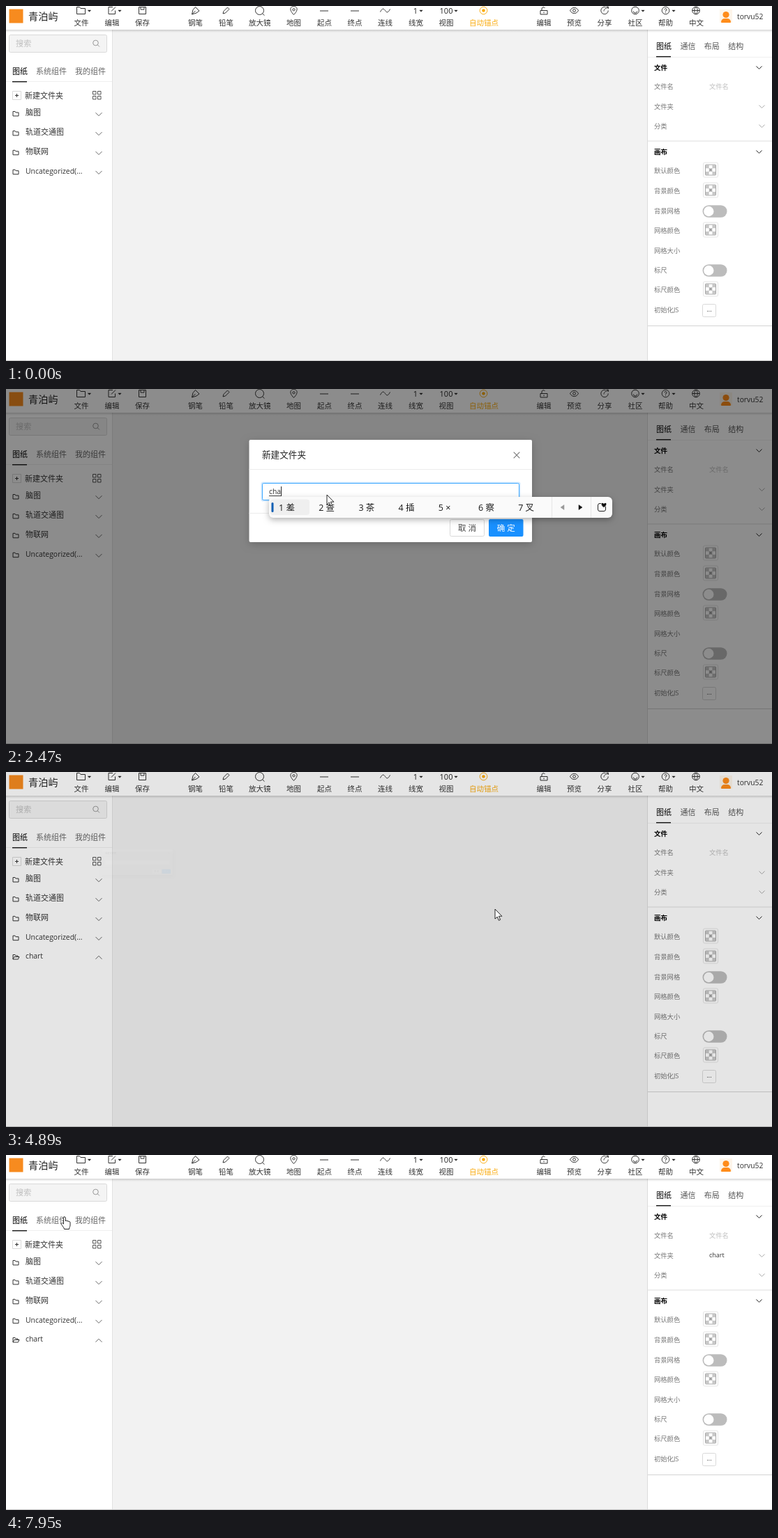
An HTML page with a canvas for the animation above (8000 ms loop, 1098 px wide and 510 px high).

```html
<!DOCTYPE html>
<html lang="zh-CN">
<head>
<meta charset="utf-8">
<title>新建文件夹</title>
<style>
html, body { margin: 0; width: 100%; height: 100%; overflow: hidden; background: #fff; }
canvas { display: block; width: 100vw; height: 100vh; }
</style>
</head>
<body>
<canvas id="stage"></canvas>
<script>
const W = 1098, H = 510, LOOP = 8000;
const FONT = '"Open Sans", "Noto Sans CJK SC", "Noto Sans CJK", sans-serif';
const BLUE = '#1890ff', INK = '#333', GREY = '#777';
const canvas = document.getElementById('stage');
const ctx = canvas.getContext('2d');
const ratio = window.devicePixelRatio || 1;
canvas.width = W * ratio;
canvas.height = H * ratio;

const clamp = v => Math.max(0, Math.min(1, v));
const within = (t, a, b) => t >= a && t < b;
const mix = (a, b, k) => a + (b - a) * k;

// y of a CSS cubic-bezier curve at x
function bezier(x1, y1, x2, y2) {
  const at = (a, b, u) => 3 * a * u * (1 - u) ** 2 + 3 * b * u * u * (1 - u) + u ** 3;
  return x => {
    let lo = 0, hi = 1;
    for (let i = 0; i < 24; i++) {
      const u = (lo + hi) / 2;
      if (at(x1, x2, u) < x) lo = u; else hi = u;
    }
    return at(y1, y2, lo);
  };
}
const zoomIn = bezier(.08, .82, .17, 1);
const zoomOut = bezier(.78, .14, .15, .86);

const ticks = [[0, 0, 1], [70, 660, 9], [840, 920, 2], [990, 1590, 9], [1680, 1740, 2],
  [2140, 2230, 2], [2390, 2470, 2], [2920, 3170, 2], [3460, 3460, 1], [4030, 4720, 10],
  [4820, 4820, 1], [4890, 5670, 11], [5730, 6130, 6], [6190, 6190, 1], [6360, 6360, 1],
  [6860, 6920, 2], [7090, 7870, 11], [7950, 7950, 1]]
  .flatMap(([a, b, n]) => Array.from({ length: n }, (_, i) => n > 1 ? Math.round(a + (b - a) * i / (n - 1)) : a));
const snap = t => ticks.reduce((last, k) => k <= t ? k : last, 0);

// ---- drawing helpers ----
function text(s, x, y, size, color = INK, align = 'left', weight = 400) {
  ctx.font = `${weight} ${size}px ${FONT}`;
  ctx.fillStyle = color;
  ctx.textAlign = align;
  ctx.fillText(s, x, y + size * .37);
}
function rect(x, y, w, h, fill) {
  ctx.fillStyle = fill;
  ctx.fillRect(x, y, w, h);
}
function box(x, y, w, h, r, fill, stroke) {
  ctx.beginPath();
  ctx.roundRect(x, y, w, h, r);
  if (fill) { ctx.fillStyle = fill; ctx.fill(); }
  if (stroke) { ctx.strokeStyle = stroke; ctx.lineWidth = 1; ctx.stroke(); }
}
function shadowBox(x, y, w, h, r, fill, blur, color) {
  ctx.save();
  ctx.shadowColor = color;
  ctx.shadowBlur = blur * ratio;
  ctx.shadowOffsetY = 3 * ratio;
  box(x, y, w, h, r, fill);
  ctx.restore();
}
function disc(x, y, r, fill) {
  ctx.beginPath();
  ctx.arc(x, y, r, 0, 7);
  ctx.fillStyle = fill;
  ctx.fill();
}
function icon(d, x, y, stroke = '#444', width = 1, fill) {
  ctx.save();
  ctx.translate(x, y);
  const p = new Path2D(d);
  if (fill) { ctx.fillStyle = fill; ctx.fill(p); }
  ctx.strokeStyle = stroke;
  ctx.lineWidth = width;
  ctx.lineJoin = 'round';
  ctx.stroke(p);
  ctx.restore();
}
const ring = r => `M${r} 0A${r} ${r} 0 1 1 ${-r} 0A${r} ${r} 0 1 1 ${r} 0`;
const down = (x, y, color, s = 4.5) => icon(`M${-s} ${-s / 2}L0 ${s / 2}L${s} ${-s / 2}`, x, y, color);
const up = (x, y, color) => icon('M-4.5 2.3L0-2.3L4.5 2.3', x, y, color);
const caretDown = (x, y) => icon('M-2.2-1H2.2L0 1.3Z', x, y, '#222', .4, '#222');

const ICONS = {
  folder: 'M-6 5V-5H-2L-.5-3H6V5Z',
  edit: 'M1-5H-5V5H4.5V0M-1 1L5-5',
  save: 'M-5-5H5V5H-5ZM-2.5-5V-1.5H2.5V-5',
  pen: 'M-5 5.5L-3.5-1L0-5L5.5 .5L1.5 3.5ZM-5 5.5L0 .5',
  pencil: 'M-4.5 4.5L-3.5 1L2-4.5L4.5-2L-1 3.5Z',
  zoom: ring(6) + 'M4.2 4.4L7 7.2',
  pin: 'M0 6C-8-2-4-6 0-6S8-2 0 6Z M1.6-1.2A1.6 1.6 0 1 1-1.6-1.2A1.6 1.6 0 1 1 1.6-1.2',
  line: 'M-6 .5H6',
  curve: 'M-7 2C-4-4-2-3 0 0S4 4 7-2',
  target: ring(5.3),
  lock: 'M-5 0H5V5.5H-5ZM-3 0V-2.5A2.4 2.4 0 0 1 1.5-3.5M0 2V3.8',
  eye: 'M-6 0C-3-5.5 3-5.5 6 0C3 5.5-3 5.5-6 0Z' + ring(1.9),
  share: 'M1.5-5A5.2 5.2 0 1 0 5.2 0M-1 1C-1-2 2-4 5-4M2.5-5.5H5.3V-2.5',
  smile: ring(5.3) + 'M-2.6 1A2.6 2.6 0 0 0 2.6 1',
  help: ring(5.3) + 'M-1.6-1.4A1.6 1.6 0 1 1 0 .4V1.4M0 2.6V3.5',
  globe: ring(5.3) + 'M-5.3 0H5.3M0-5.3C-3-2-3 2 0 5.3C3 2 3-2 0-5.3',
};
// label, centre x, icon name or number, icon x, caret x
const TOOLS = [
  ['文件', 108, 'folder', 107.5, 119.5], ['编辑', 152, 'edit', 152, 163], ['保存', 195.5, 'save', 195.5],
  ['钢笔', 271.5, 'pen', 271.5], ['铅笔', 315.5, 'pencil', 315.5], ['放大镜', 363.7, 'zoom', 363.5],
  ['地图', 412.5, 'pin', 412.5], ['起点', 456.5, 'line', 456], ['终点', 500, 'line', 500],
  ['连线', 543.5, 'curve', 543.5], ['线宽', 587.5, '1', 587, 595], ['视图', 631, '100', 631, 645],
  ['自动锚点', 685, 'target', 684.5], ['编辑', 771, 'lock', 771], ['预览', 814.5, 'eye', 814.5],
  ['分享', 858, 'share', 858], ['社区', 902, 'smile', 902, 913], ['帮助', 945.5, 'help', 945.5, 957],
  ['中文', 989.5, 'globe', 989],
];

function header() {
  const g = ctx.createLinearGradient(0, 33, 0, 38);
  g.addColorStop(0, 'rgba(0,0,0,.2)');
  g.addColorStop(1, 'rgba(0,0,0,0)');
  rect(0, 33, W, 5, g);
  rect(0, 0, W, 34, '#fff');
  rect(4.5, 4.5, 20, 20, '#f78b1f');
  text('青泊屿', 32, 15, 14.2, '#222');
  for (const [label, x, name, ix, cx] of TOOLS) {
    const color = name === 'target' ? '#faad14' : INK;
    text(label, x, 24, 10.5, color, 'center');
    if (ICONS[name]) icon(ICONS[name], ix, 6.5, color);
    else text(name, ix, 7, 11, '#222', 'center');
    if (name === 'target') disc(ix, 6.5, 2.3, color);
    if (cx) caretDown(cx, 7);
  }
  rect(1023, 5, 18, 19, '#fdf5ea');
  disc(1032, 12.5, 4.6, '#ff8c1a');
  box(1025, 18, 14, 6, [5, 5, 1, 1], '#ff8c1a');
  text('torvu52', 1048, 15, 10.3, INK);
}

function folderRow(name, y, open, color) {
  const closed = 'M-4 3.5V-3H-1L0-1.5H4V3.5Z';
  const opened = 'M-4 3.5V-3H-1L0-1.5H3V0M-4 3.5L-2.2 0H5L3.4 3.5Z';
  icon(open ? opened : closed, 14, y + 1.5, color);
  text(name, 28, y, /^[\x00-\x7f]/.test(name) ? 10.4 : 11, color);
  const arrow = color === INK ? '#666' : color;
  if (open) up(133, y + 2.5, arrow); else down(133, y + 2.5, arrow);
}

function leftPanel(t) {
  rect(0, 34, 152, 476, '#fff');
  rect(152, 34, 1, 476, '#e2e2e2');
  box(4.5, 41.5, 140, 25, 2, '#f4f4f4', '#d9d9d9');
  text('搜索', 14, 54, 11.2, '#bfbfbf');
  icon(ring(3.8) + 'M2.7 2.7L5.5 5.5', 128.5, 53, '#999');
  rect(0, 108, 152, 1, '#efefef');
  text('图纸', 9, 94, 11, '#000', 'left', 500);
  text('系统组件', 43, 94, 11, '#666');
  text('我的组件', 99, 94, 11, '#666');
  rect(9, 108, 21, 1.5, '#222');

  const hot = within(t, 580, 850) ? BLUE : INK;
  box(9.5, 122.5, 12, 12, 0, null, hot === BLUE ? BLUE : '#d9d9d9');
  icon('M-2.5 0H2.5M0-2.5V2.5', 15.5, 128.5, hot);
  text('新建文件夹', 27, 128.5, 11, hot);
  for (const x of [124.5, 131.5]) for (const y of [122.5, 129.5]) box(x, y, 4.5, 4.5, 0, null, '#555');

  ['脑图', '轨道交通图', '物联网', 'Uncategorized(...'].forEach((n, i) => folderRow(n, 153 + i * 27.9, false, INK));
  if (t < 4700) return;
  const over = within(t, 5600, 7100);
  folderRow('chart', 264, true, over ? BLUE : INK);
  if (!over) return;
  icon('M-4.5-6H1.5L4.5-3V6H-4.5ZM1.5-6V-3H4.5', 103.5, 266.5, BLUE);
  icon('M-5.5-4H5.5M-2-4V-6H2V-4M-4.3-4V6H4.3V-4M-1.6-1.5V3.5M1.6-1.5V3.5', 120.5, 266.5, BLUE);
}

function swatch(y) {
  box(999.5, y - 10.5, 21, 21, 2, '#fff', '#e4e4e4');
  for (let i = 0; i < 9; i += 2) rect(1003 + i % 3 * 4.7, y - 7 + Math.floor(i / 3) * 4.7, 4.7, 4.7, '#c8c8c8');
  box(1002.5, y - 7.5, 15, 15, 1, null, '#a8a8a8');
  icon('M-1.8-1.8L1.8 1.8M1.8-1.8L-1.8 1.8', 1010, y, '#888');
}
function toggle(y) {
  box(998.5, y - 8.7, 35, 17.4, 8.7, '#bcbcbc');
  disc(1007.3, y, 7.2, '#fff');
}

function rightPanel(t) {
  rect(919, 34, 179, 476, '#fff');
  rect(919, 34, 1, 476, '#dcdcdc');
  ['图纸', '通信', '布局', '结构'].forEach((s, i) =>
    text(s, 932 + i * 34.4, 58, 11, i ? '#555' : '#000', 'left', i ? 400 : 500));
  rect(920, 73, 178, 1, '#efefef');
  rect(932, 72, 21, 1.5, '#222');
  [['文件', 88.5], ['画布', 209.5]].forEach(([s, y]) => {
    text(s, 929, y, 9.5, '#000', 'left', 700);
    down(1079.5, y, '#222', 4);
  });
  [['文件名', 116], ['文件夹', 144.5], ['分类', 172.5], ['默认颜色', 237], ['背景颜色', 265.5],
    ['背景网格', 295], ['网格颜色', 323], ['网格大小', 352], ['标尺', 380], ['标尺颜色', 408],
    ['初始化JS', 437]].forEach(([s, y]) => text(s, 929, y, 9.3, GREY));
  text('文件名', 1008, 116, 9.3, '#bfbfbf');
  if (t >= 6360) text('chart', 1008, 144, 9, INK);
  down(1083.5, 144.5, '#aaa', 4);
  down(1083.5, 172.5, '#aaa', 4);
  rect(920, 193.5, 178, 1, '#dedede');
  [235.5, 264.5, 321.5, 406.5].forEach(swatch);
  toggle(295);
  toggle(380);
  box(998.5, 428.5, 19, 18, 2, '#fff', '#d9d9d9');
  text('...', 1008, 435.5, 9, INK, 'center');
  rect(920, 459, 178, 1, '#d4d4d4');
}

function tooltip(t) {
  const a = clamp((t - 5960) / 150) * (1 - clamp((t - 7080) / 150));
  if (!a) return;
  ctx.save();
  ctx.globalAlpha = a;
  box(76, 223, 54.5, 26, 2, 'rgba(0,0,0,.7)');
  icon('M-4 0H4L0 3.6Z', 103.2, 249, 'transparent', 1, 'rgba(0,0,0,.7)');
  text('新建图纸', 103.3, 236, 10.8, '#fff', 'center');
  ctx.restore();
}

// ---- dialog ----
const TYPED = [
  [2140, 'c', '才 从 次 错 草 此 曾'],
  [2390, 'ch', '吃 出 成 长 车 穿 传'],
  [2470, 'cha', '差 查 茶 插 × 察 叉'],
  [2920, 'char', '插入 差人 茶人 查人 差 察 叉'],
  [3170, 'chart', 'chart 插入 茶人 查 差 察 叉'],
];
const typedAt = t => TYPED.reduce((last, k) => k[0] <= t ? k : last, null);

function field(t) {
  const focus = clamp((t - 1640) / 100) * (1 - clamp((t - 4560) / 240));
  if (focus) {
    ctx.save();
    ctx.globalAlpha *= focus;
    box(365.5, 133.5, 372, 28, 3, 'rgba(24,144,255,.2)');
    ctx.restore();
  }
  box(367.5, 135.5, 368, 24, 2, '#fff',
    `rgb(${mix(217, 64, focus)},${mix(217, 169, focus)},${mix(217, 255, focus)})`);
  if (t < 1680 || t >= 4700) return;
  const typed = typedAt(t);
  const word = typed ? typed[1] : '';
  text(word, 377, 147, 10.4, '#333');
  const end = 377 + (word ? ctx.measureText(word).width : 0);
  if (within(t, 2140, 3460)) rect(377, 153, end - 377, 1, '#444');
  if (t < 4570) rect(end, 140, 1, 14, '#222');
}

// The mask fades linearly; the dialog zooms out of the clicked point a moment later.
function dialog(t) {
  if (!within(t, 827, 4935)) return;
  const closing = clamp((t - 4735) / 200);
  const mask = clamp((t - 827) / 300) * (1 - closing);
  const zoom = closing ? 1 - zoomOut(closing) : zoomIn(clamp((t - 854) / 300));
  rect(0, 0, W, H, `rgba(0,0,0,${.45 * mask})`);

  const ox = 67, oy = 124, s = .2 + .8 * zoom;
  ctx.save();
  ctx.globalAlpha = zoom;
  ctx.translate(ox, oy);
  ctx.scale(s, s);
  ctx.translate(-ox, -oy);
  shadowBox(348.5, 73, 405.5, 147, 2, '#fff', 12 * s, 'rgba(0,0,0,.2)');
  text('新建文件夹', 367, 94.5, 12.6, '#262626');
  icon('M-4.3-4.3L4.3 4.3M4.3-4.3L-4.3 4.3', 732, 95, '#777', 1.1);
  rect(348.5, 115, 405.5, 1, '#ececec');
  rect(348.5, 178, 405.5, 1, '#ececec');
  field(t);
  box(636.5, 187.5, 49, 24, 2, '#fff', '#d9d9d9');
  text('取 消', 661, 199.5, 11.5, '#444', 'center');
  box(692, 187, 49.5, 25, 2, t > 4500 ? '#2597ff' : BLUE);
  text('确 定', 716.8, 199.5, 11.5, '#fff', 'center', 500);
  ctx.restore();
}

function candidates(t) {
  if (!within(t, 2140, 3460)) return;
  const extra = t >= 3170 ? 4 : 0;
  ctx.save();
  ctx.globalAlpha = t < 2230 ? .6 : 1;
  shadowBox(377, 155, 492 + extra, 30, 6, '#fafafa', 8, 'rgba(0,0,0,.3)');
  box(379, 158.5, 56 + extra, 22.5, 4, '#efefef');
  box(380.5, 163, 3, 14, 1.5, '#0f5fb4');
  typedAt(t)[2].split(' ').forEach((c, i) =>
    text(`${i + 1} ${c}`, 391 + i * 57.2 + (i ? extra : 0), 170, 12.5, '#1a1a1a'));
  ctx.translate(extra, 0);
  rect(782, 155, 1, 30, '#e6e6e6');
  rect(838, 155, 1, 30, '#e6e6e6');
  icon('M2.5-3.5V3.5L-2.5 0Z', 797.5, 170, '#999', .5, '#999');
  icon('M-2.5-3.5V3.5L2.5 0Z', 823.5, 170, '#111', .5, '#111');
  box(848.5, 164.5, 11, 11, 2.5, null, '#222');
  icon('M0 4C-7-1-3-5 0-2C3-5 7-1 0 4Z', 857, 166.5, '#fafafa', 1, '#111');
  ctx.restore();
}

// ---- pointer ----
const PATH = [[70, 866, 479], [586, 84, 116], [660, 71, 125], [840, 71, 125], [920, 66, 124],
  [990, 66, 124], [1590, 460, 152], [4030, 460, 152], [4570, 706, 198], [4800, 706, 198],
  [4820, 701, 197], [4890, 701, 197], [5670, 46, 264], [6050, 104, 268], [6800, 104, 268],
  [6860, 107, 268], [6920, 111, 269], [7090, 150, 262], [7390, 585, 190], [7870, 119, 106],
  [7950, 84, 89]];
const SHAPES = {
  arrow: 'M0 0V14L3.2 11L5.4 16.2L7.6 15.2L5.4 10.2H9.9Z',
  hand: 'M-1.5 10V1.2C-1.5-.6 1.3-.6 1.3 1.2V6C1.3 4.6 3.7 4.7 3.7 6.3C3.9 5.2 5.9 5.4 5.9 7C6.2 6.2 8 6.4 8 8V12C8 14 6.5 15 6.5 17.5H-.5C-.5 15.5-3 13.5-4.8 10.2C-5.3 8.6-3.5 8-2.6 9Z',
  beam: 'M-3-7H-1L0-6L1-7H3M0-6V6M-3 7H-1L0 6L1 7H3',
};

function shapeAt(t) {
  if ([[580, 850], [4500, 4820], [5600, 7150], [7800, LOOP]].some(([a, b]) => within(t, a, b))) return 'hand';
  if (within(t, 1500, 2140) || within(t, 3460, 4150)) return 'beam';
  return 'arrow';
}

function pointer(t) {
  if (t < 70) return;
  const i = Math.max(1, PATH.findIndex(k => k[0] >= t));
  const [t0, x0, y0] = PATH[i - 1], [t1, x1, y1] = PATH[i];
  const u = clamp((t - t0) / (t1 - t0)), k = u * u * (3 - 2 * u);
  const shape = shapeAt(t);
  icon(SHAPES[shape], mix(x0, x1, k), mix(y0, y1, k), '#111', .9, shape === 'beam' ? null : '#fff');
}

function draw(now) {
  const t = snap(now % LOOP);
  ctx.setTransform(ratio, 0, 0, ratio, 0, 0);
  rect(0, 0, W, H, '#f2f2f2');
  leftPanel(t);
  rightPanel(t);
  header();
  rect(0, 509, W, 1, '#c4c4c4');
  tooltip(t);
  dialog(t);
  candidates(t);
  pointer(t);
}

const start = performance.now();
function loop() {
  draw(performance.now() - start);
  requestAnimationFrame(loop);
}
loop();
</script>
</body>
</html>
```
